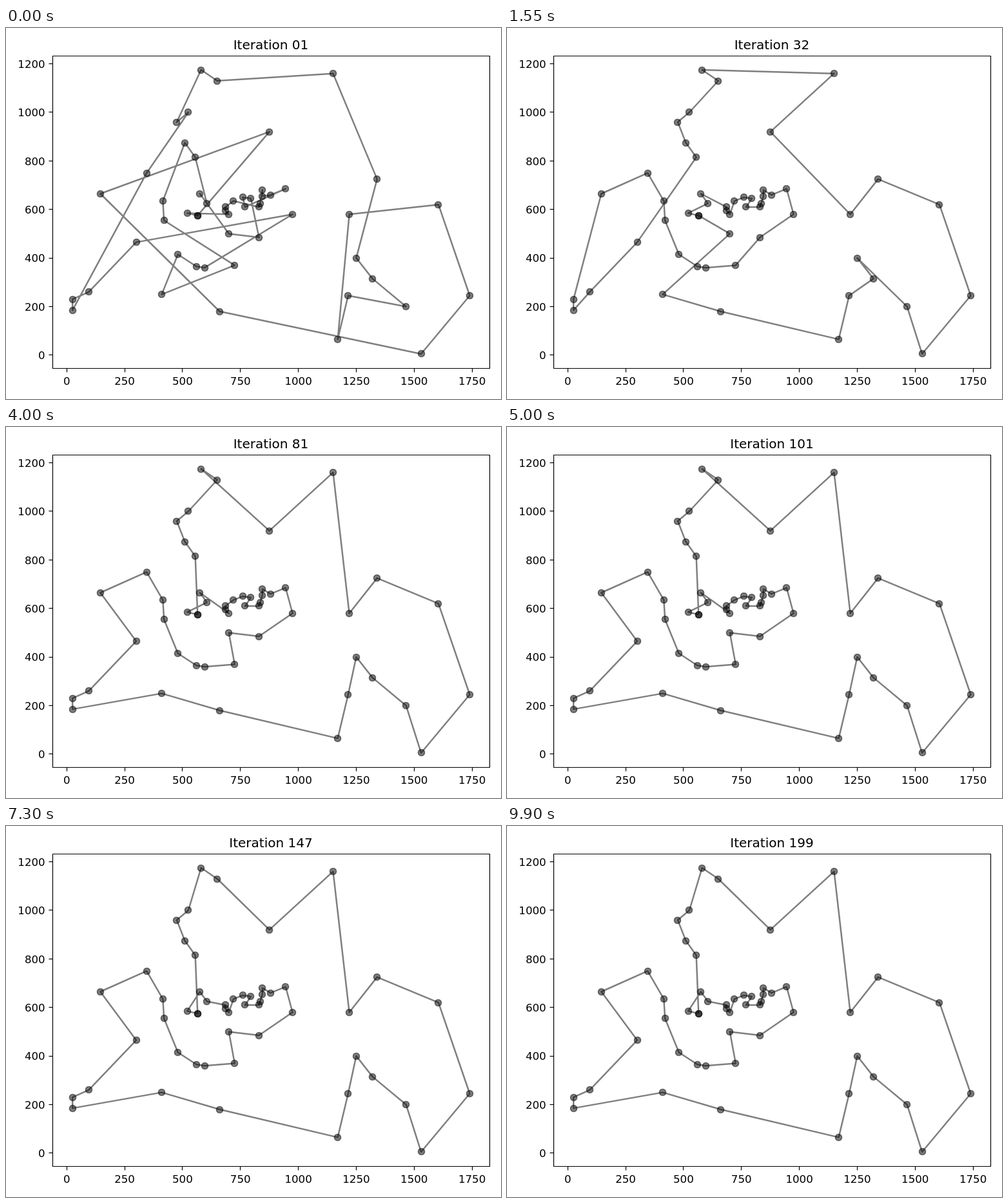
An HTML page with a canvas that plays this animation: 768x576 px, repeating every 9.95 s.

```html
<!DOCTYPE html>
<html lang="en">
<head>
<meta charset="utf-8">
<style>
html, body { margin: 0; overflow: hidden; background: #fff; }
canvas { display: block; }
</style>
</head>
<body>
<canvas id="plot" width="768" height="576"></canvas>
<script>
const ctx = document.getElementById('plot').getContext('2d');
const LOOP = 9950, STEP = 50;
const box = { left: 72.5, right: 750.5, top: 43.5, bottom: 528.5 };

// Cities as x, y pairs, in the order of the best tour
const cities = [
  [565, 575], [520, 585], [575, 665], [605, 625], [685, 610], [685, 595], [700, 580], [720, 635],
  [760, 650], [795, 645], [770, 610], [830, 610], [835, 625], [845, 655], [845, 680], [880, 660],
  [945, 685], [975, 580], [830, 485], [700, 500], [725, 370], [595, 360], [560, 365], [480, 415],
  [420, 555], [415, 635], [345, 750], [145, 665], [300, 465], [95, 260], [25, 230], [25, 185],
  [410, 250], [660, 180], [1170, 65], [1215, 245], [1250, 400], [1320, 315], [1465, 200], [1530, 5],
  [1740, 245], [1605, 620], [1340, 725], [1220, 580], [1150, 1160], [875, 920], [650, 1130], [580, 1175],
  [525, 1000], [475, 960], [510, 875], [555, 815]
];

// Each tour starts at a time in ms; "a-b" is a run of cities, up or down
const tours = [
  [0, '0 1 6-4 7 11 12 14 13 15 16 10 8 9 18 19 2 3 51 50 25 24 20 32 23-21 17 28-31 26 48 49 47 46 44 42 36-38 35 34 43 41-39 33 27 45'],
  [150, '0 1 3 2 51 23-21 19 6-4 7 8 10 9 11-18 20 33 28 27 30 29 31 32 50-44 42 43 36 37 35 38-41 34 26-24'],
  [700, '0 1 3 2 4-18 20-27 30 31 29 28 51-48 46 47 44 45 43-38 36 37 35-32 19'],
  [2700, '0 1 3 2 6-4 7-45 47 46 48-51'],
  [6500, '0-51']
].map(([start, route]) => ({ start, stops: expand(route) }));

function expand(route) {
  return route.split(' ').flatMap(part => {
    const [a, b = a] = part.split('-').map(Number);
    const dir = Math.sign(b - a);
    return Array.from({ length: Math.abs(b - a) + 1 }, (_, i) => a + dir * i);
  });
}

const px = x => 72.4 + (x + 60.75) * 677.9 / 1886.5;
const py = y => 528 - (y + 53.5) * 485 / 1287;
const snap = v => Math.floor(v) + 0.5;

function text(str, x, y, size, align) {
  ctx.font = `${size}px "DejaVu Sans", sans-serif`;
  ctx.textAlign = align;
  ctx.fillText(str, x, y);
}

function line(x1, y1, x2, y2) {
  ctx.beginPath();
  ctx.moveTo(x1, y1);
  ctx.lineTo(x2, y2);
  ctx.stroke();
}

function drawAxes() {
  ctx.strokeStyle = ctx.fillStyle = '#000';
  ctx.lineWidth = 1.2;
  ctx.strokeRect(box.left, box.top, box.right - box.left, box.bottom - box.top);
  for (let v = 0; v <= 1750; v += 250) {
    const x = snap(px(v));
    line(x, box.bottom, x, box.bottom + 6);
    text(v, px(v), 554, 16.67, 'center');
  }
  for (let v = 0; v <= 1200; v += 200) {
    const y = snap(py(v));
    line(box.left, y, box.left - 6, y);
    text(v, 60.7, py(v) + 6.2, 16.67, 'right');
  }
}

function drawTour(stops) {
  const points = [...stops, stops[0]].map(i => [px(cities[i][0]), py(cities[i][1])]);
  ctx.strokeStyle = ctx.fillStyle = 'rgba(0, 0, 0, 0.5)';
  ctx.lineWidth = 2.5;
  ctx.lineJoin = 'round';
  ctx.beginPath();
  points.forEach(p => ctx.lineTo(...p));
  ctx.stroke();
  ctx.lineWidth = 1.67;
  for (const [x, y] of points) {
    ctx.beginPath();
    ctx.arc(snap(x), snap(y), 5, 0, 2 * Math.PI);
    ctx.fill();
    ctx.stroke();
  }
}

function draw() {
  const time = performance.now() % LOOP;
  const iteration = Math.floor(time / STEP) + 1;
  ctx.fillStyle = '#fff';
  ctx.fillRect(0, 0, 768, 576);
  drawTour(tours.findLast(tour => tour.start <= time).stops);
  drawAxes();
  text('Iteration ' + String(iteration).padStart(2, '0'), 411, 33, 20, 'center');
  requestAnimationFrame(draw);
}
draw();
</script>
</body>
</html>
```
